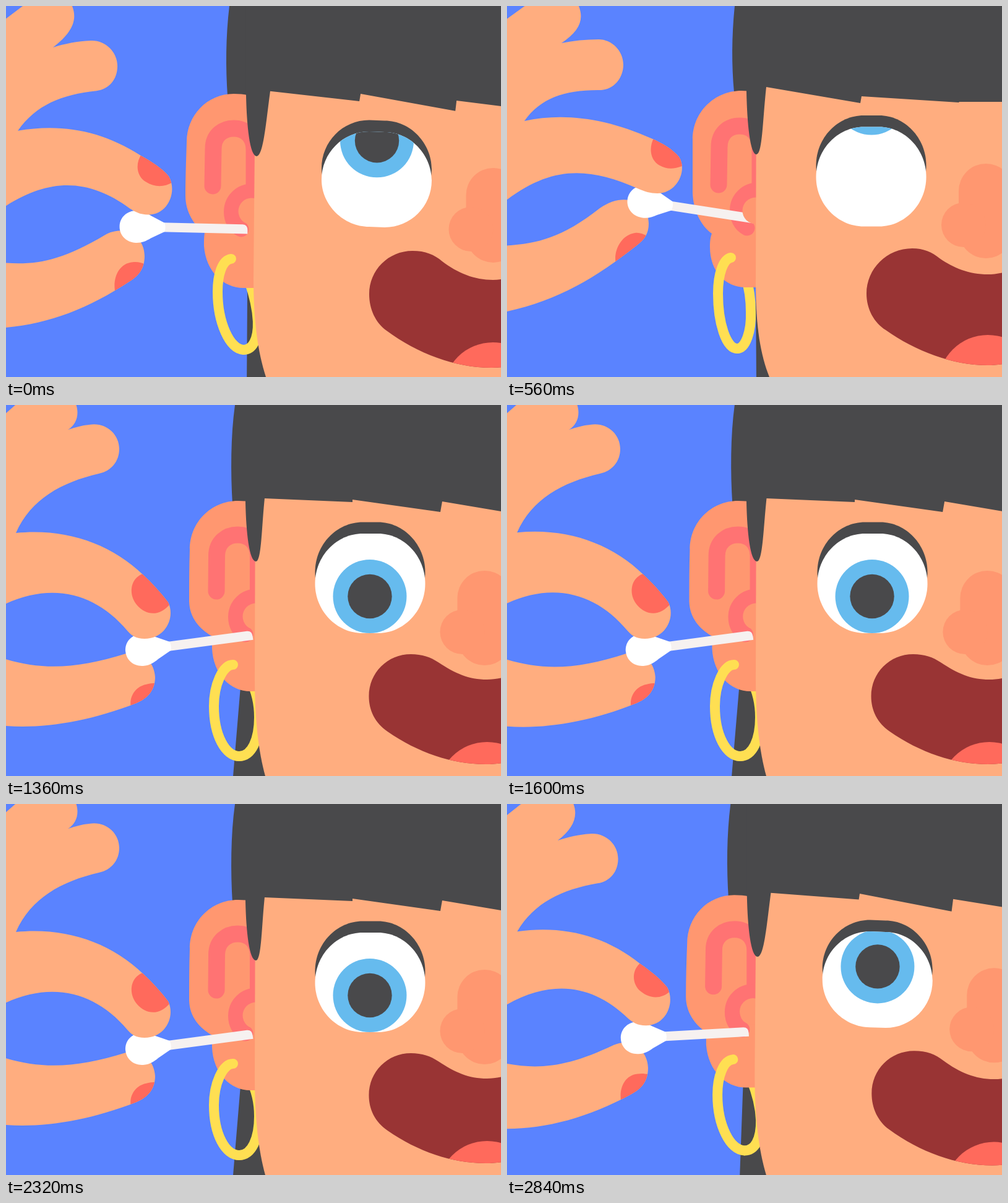
These frames come from a looping animation (800 px wide and 600 px high, 2.88 s). An HTML page with a canvas:

```html
<!DOCTYPE html>
<html lang="en">
<head>
<meta charset="utf-8">
<title>Ear cleaning</title>
<style>
html, body { margin: 0; width: 100%; height: 100%; overflow: hidden; background: #5a83ff; }
canvas { display: block; }
</style>
</head>
<body>
<canvas id="stage" width="800" height="600"></canvas>
<script>
const ctx = document.getElementById('stage').getContext('2d');
const SKIN = '#ffad7f', EAR = '#ff9770', PINK = '#ff7373', HAIR = '#49494b', NAIL = '#ff6a5c', GOLD = '#ffdf52';
const LOOP = 2880, SWAY = 960, LEAD = 114, LIFT = 209, DROP_AT = 720;
const NUMBER = /-?[\d.]+/g;

const ease = v => { v = Math.min(1, Math.max(0, v)); return v * v * (3 - 2 * v); };
const MID = ease(LEAD / LIFT);          // lift at which the "mid" pose is reached
const EDGE = Math.cos(Math.PI / 6);     // turn at which the "right" and "left" poses sit
let side = 0, lift = 0;

const sideOf = turn => (EDGE - turn) / (2 * EDGE);

function setTime(t) {
  const u = (t + LEAD) % LOOP;
  side = sideOf(Math.cos(t / SWAY * 2 * Math.PI));
  lift = ease(u / LIFT) - ease((u - DROP_AT) / LIFT);
}

// Blends four poses: head right, head left, halfway up (turned right), fully up (turned left).
// A pose given as [dx, dy] is the right pose shifted.
function blend(right, ...others) {
  const R = right.match(NUMBER).map(Number);
  const [L, M, U] = others.map(p => typeof p === 'string'
    ? p.match(NUMBER).map(Number)
    : R.map((n, i) => n + p[i % 2]));
  return () => R.map((r, i) => {
    const sway = L[i] - r;
    const mid = M[i] - (r + sway * sideOf(1)), up = U[i] - L[i];
    const a = (mid - MID * MID * up) / (MID - MID * MID);
    return r + sway * side + a * lift + (up - a) * lift * lift;
  });
}

function morph(right, ...others) {
  const values = blend(right, ...others);
  return () => {
    const list = values();
    let i = 0;
    return new Path2D(right.replace(NUMBER, () => list[i++].toFixed(3) + ' '));
  };
}

const backHair = morph(
  'M360 0 C354 50 354 110 358 160 L362 455 L349 600 L500 600 L500 0Z',
  'M370 0 C363 50 363 110 366 160 L379 455 L367 600 L500 600 L500 0Z',
  'M361 0 C355 50 355 100 358 145 L390 455 L389 600 L500 600 L500 0Z',
  'M368 0 C363 50 363 95 367 140 L402 455 L403 600 L500 600 L500 0Z');

const ear = morph(
  'M410 165 C400 158 385 155 368 155 C324 155 290 190 290 234 C289 262 289 290 289 318 C290 345 306 362 326 374 C326 380 326 388 326 394 C328 435 355 463 388 463 L410 463Z',
  [7, 0],
  'M410 152 C400 145 385 142 368 142 C325 142 292 177 292 220 C291 250 290 280 290 307 C290 333 304 355 321 367 C320 373 320 380 320 388 C323 429 351 456 384 456 L410 456Z',
  'M410 147 C404 140 394 137 379 137 C335 137 300 172 300 216 C300 245 300 275 300 302 C301 330 313 355 331 368 C328 376 328 384 328 390 C328 428 352 455 386 455 L410 455Z');

const earFold = morph(
  'M333.5 301 L334 244 C334 222 350 210 368 210 C386 210 401 222 401 244 L401 320',
  [6.5, 0],
  'M334 291 L335 231 C335 209 351 198 368 198 C386 198 401 210 401 232 L401 310',
  'M342 289 L343 228 C343 206 358 194 376 194 C394 194 409 206 409 228 L409 306');
const earSwirl = morph(
  'M404 310 C377 308 364.500 326 364.500 343 C364.500 355 370 366 380 371',
  [7, 0], [0, -10], [8, -12]);
const tragus = blend('398 342', [6, 0], [-1, -10], [4, -11]);

const ringFront = morph(
  'M367 420 C350 420 336 453 336 487 C336 535 355 568 377 568',
  [0, 0],
  'M364 409 C349 411 342 435 342 462 C342 512 362 556 384 556',
  'M362 407 C350 409 341 432 341 465 C341 512 354 554 372 554');
const ringBack = morph(
  'M377 568 C397 568 409 541 409 505 C409 480 403 460 395 445',
  [0, 0],
  'M384 556 C398 556 408 540 407 510 C406 490 400 465 393 445',
  'M372 554 C386 554 395 525 394 495 C394 475 391 455 386 440');

const face = morph(
  'M403 115 L402 440 C402 510 408 560 419 600 L800 600 L800 115Z',
  [0, 0],
  'M403 115 L400 440 C400 510 407 560 420 600 L800 600 L800 115Z',
  'M403 115 L402 450 C402 520 410 565 424 600 L800 600 L800 115Z');

const fringe = morph(
  'M387 0 L387 157 C388 205 393 253 404 253 C415 253 419 200 425 151 L569 157 L570 153 L712 173 L715 156 L800 171 L800 0Z',
  'M387 0 L387 157 C388 205 393 253 404 253 C413 253 413 200 418 151 L560 157 L560 153 L702 173 L705 156 L800 172 L800 0Z',
  'M388 0 L388 145 C389 193 394 243 405 243 C416 243 420 190 427 138 L571 154 L573 142 L726 170 L728 153 L800 162 L800 0Z',
  'M387 0 L387 138 C388 190 393 240 403 240 C413 240 413 185 419 131 L571 157 L573 146 L730 156 L731 155 L800 155 L800 0Z');

const eyeball = morph(
  'M509 289 C509 244 544 208 586 208 L611 208 C652 208 687 244 687 289 C687 333 652 369 611 369 L586 369 C544 369 509 333 509 289Z',
  [-9.5, 0],
  'M510 281 C510 238 544 203 587 203 L612 204 C654 204 688 241 688 282 C688 324 654 358 612 358 L587 357 C546 357 510 322 510 281Z',
  [-9.5, -12.5]);
const iris = blend('597.5 309.5', [-9.5, 0], '599.5 219', '589 149');

const nose = blend('787 312', [-13.5, 0], [0.5, -6], [-13, -13]);

const mouth = morph(
  'M830 436 C815 441 800 444 787 444 C757 444 735 434 708 416 C696 408 682 403 664 403 C626 403 596 433 596 471 C596 494 606 514 626 528 C675 562 730 581 785 581 C800 581 815 579 830 575Z',
  [-9.5, 0],
  'M830 435 C815 440 800 443 787 443 C757 443 730 432 705 413 C692 402 678 396 657 396 C618 396 587 427 587 466 C587 490 597 512 615 525 C665 562 725 585 785 585 C800 585 815 583 830 579Z',
  'M820 426 C805 431 790 434 777 434 C747 434 722 424 699 408 C687 398 673 392 655 392 C614 392 581 425 581 465 C581 490 593 512 612 524 C660 558 720 581 777 581 C790 581 805 579 820 575Z');
const tongue = blend('787 625', [-9.5, 0], [0, -1], [-10, -13]);

const hand = morph(
  'M-10 22 L22 -6 L111 -6 C120 12 115 31 100 40 C112 36 123 33 134 32 C160 27 183 46 183 71 C183 91 170 107 150 111 C90 125 40 152 17 204 C95 196 165 222 217 274 C231 288 245 303 256 319 C268 343 252 378 218 378 C204 378 197 373 190 365 C140 302 70 280 -10 324Z',
  'M-10 22 L22 -6 L111 -6 C120 12 115 31 100 40 C112 36 123 33 134 32 C160 27 183 46 183 71 C183 91 170 107 150 111 C90 125 40 152 16 207 C95 199 168 223 222 275 C236 288 250 303 262 319 C274 343 258 378 224 378 C210 378 203 373 196 365 C145 304 72 284 -10 326Z',
  'M-10 28 L35 -6 L104 -6 C118 20 108 42 76 67 C95 61 115 57 137 56 C160 55 180 74 180 97 C180 119 166 135 146 137 C90 143 48 160 19 202 C90 190 155 202 217 242 C235 252 251 262 263 276 C277 300 262 338 230 338 C216 338 208 333 200 328 C135 280 70 275 -10 330Z',
  'M-10 28 L37 -6 L113 -6 C127 20 118 40 88 60 C107 56 127 54 148 54 C170 54 188 73 188 95 C188 117 172 135 152 136 C95 135 55 148 28 186 C90 172 160 181 233 214 C252 222 268 232 278 244 C292 266 275 303 243 303 C232 303 222 300 211 295 C130 260 70 257 -10 321Z');
const handNail = morph(
  'M220 272 C195 276 190 306 206 324 C222 342 245 342 262 318 L280 290Z',
  [6, 0],
  'M219 240 C208 256 211 276 226 285 C240 294 256 294 270 285 L285 262Z',
  'M238 212 C228 230 232 250 247 258 C259 265 272 264 288 257 L300 235Z');

const thumb = morph(
  'M-10 411 C55 434 115 431 188 402 C212 394 234 415 235 440 C235 462 222 475 205 482 C125 518 50 528 -10 521Z',
  'M-10 408 C55 430 115 427 194 402 C218 394 240 415 241 440 C241 462 228 475 211 482 C130 514 50 525 -10 518Z',
  'M-10 415 C45 420 85 415 160 371 C192 353 224 373 224 405 C224 425 215 437 200 446 C130 492 65 516 -10 521Z',
  'M-10 388 C45 385 85 378 150 327 C188 300 229 315 229 352 C229 368 222 378 210 387 C140 442 80 478 -10 496Z');
const thumbNail = morph(
  'M196 490 C192 470 205 455 220 452 C226 450 231 450 236 450 L248 460 L220 495Z',
  [6, 0],
  'M177 465 C172 445 180 417 205 415 C213 414 219 416 224 418 L235 430 L210 460Z',
  'M177 420 C170 400 183 370 207 367 C214 366 220 369 227 372 L240 390 L212 425Z');

// x, y of the cotton head and the angle of the stick in degrees
const swab = blend('214.5 396 -7.6', '220 396 -7.6', '210.5 357.5 1.2', '221.5 316.5 8.8');
const cotton = new Path2D('M-27 0 C-27 -15 -15 -26 0 -26 C10 -26 16 -23 24 -18 L46 -7 Q48 0 46 7 L24 18 C16 23 10 26 0 26 C-15 26 -27 15 -27 0Z');
const stick = new Path2D('M40 -7.500 L172 -7.500 Q180 -7 180 2 L180 7.500 L40 7.500Z');

function fill(path, color) {
  ctx.fillStyle = color;
  ctx.fill(path);
}

function stroke(path, color, width) {
  ctx.strokeStyle = color;
  ctx.lineWidth = width;
  ctx.stroke(path);
}

function circle([x, y], radius, color) {
  ctx.beginPath();
  ctx.arc(x, y, radius, 0, 2 * Math.PI);
  ctx.fillStyle = color;
  ctx.fill();
}

// Fills a shape, then draws details that stay inside it.
function masked(path, color, details) {
  fill(path, color);
  ctx.save();
  ctx.clip(path);
  details();
  ctx.restore();
}

function drawSwab() {
  const [x, y, angle] = swab();
  ctx.save();
  ctx.translate(x, y);
  ctx.rotate(angle * Math.PI / 180);
  fill(stick, '#f6f1f0');
  fill(cotton, '#fff');
  ctx.restore();
}

function drawEye() {
  const ball = eyeball();
  ctx.save();
  ctx.translate(0, -18.5);
  fill(ball, HAIR);
  ctx.restore();
  masked(ball, '#fff', () => {
    circle(iris(), 59.5, '#66bbee');
    circle(iris(), 35.7, HAIR);
  });
}

function drawNose() {
  const [x, y] = nose();
  const bridge = new Path2D();
  bridge.roundRect(x - 44, y - 44, 88, 153, 44);
  fill(bridge, EAR);
  circle([x - 36, y + 55], 36, EAR);
}

function draw(t) {
  setTime(t);
  ctx.fillStyle = '#5a83ff';
  ctx.fillRect(0, 0, 800, 600);
  ctx.lineCap = 'round';

  fill(backHair(), HAIR);
  stroke(ringBack(), GOLD, 16);
  masked(ear(), EAR, () => {
    stroke(earFold(), PINK, 27);
    stroke(earSwirl(), PINK, 25);
  });
  stroke(ringFront(), GOLD, 16);

  masked(thumb(), SKIN, () => fill(thumbNail(), NAIL));
  drawSwab();
  circle(tragus(), 21.5, EAR);
  masked(hand(), SKIN, () => fill(handNail(), NAIL));

  fill(face(), SKIN);
  drawEye();
  drawNose();
  masked(mouth(), '#993434', () => circle(tongue(), 80, NAIL));
  fill(fringe(), HAIR);
}

const start = performance.now();
function tick() {
  draw((performance.now() - start) % LOOP);
  requestAnimationFrame(tick);
}
tick();
</script>
</body>
</html>
```
